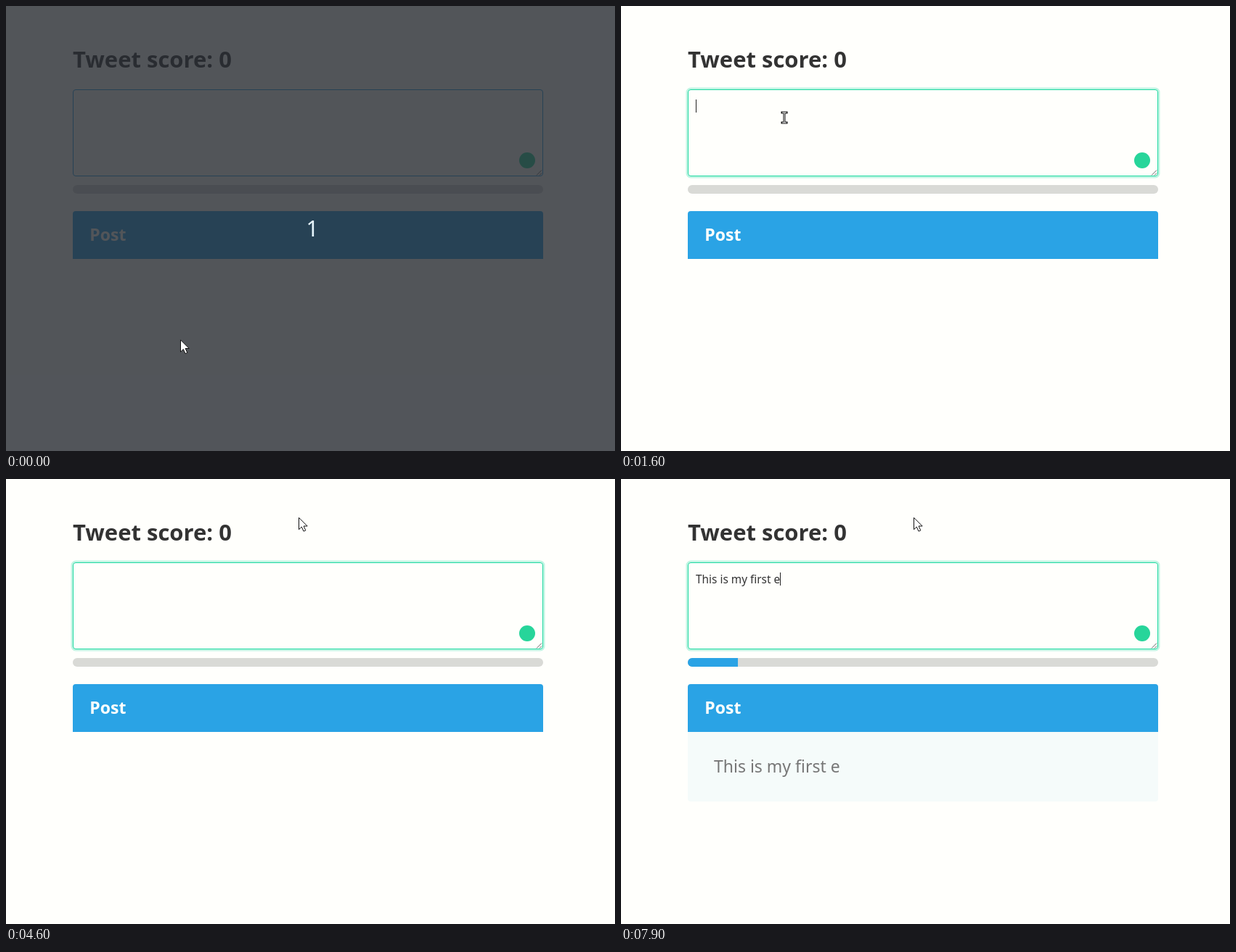
Write an HTML page that moves like this. It is 839 px wide and 614 px high and loops after 8000 ms.

```html
<!DOCTYPE html>
<html lang="en">
<head>
<meta charset="utf-8">
<title>Post score</title>
<style>
  html, body { margin: 0; width: 100%; height: 100%; overflow: hidden; background: #fffffc; }
  svg { display: block; width: 839px; height: 614px; }
  text { font-family: "Noto Sans", "Open Sans", sans-serif; white-space: pre; }
  .bold { font-weight: 700; }
</style>
</head>
<body>
<svg viewBox="0 0 839 614">
  <defs>
    <clipPath id="trackClip"><rect x="92" y="247" width="648" height="12" rx="6"/></clipPath>
  </defs>
  <rect width="839" height="614" fill="#fffffc"/>

  <text class="bold" x="92" y="85" font-size="31" fill="#333">Tweet score: 0</text>

  <g id="glow" fill="none" stroke="#1fd9a1">
    <rect x="91" y="114" width="650" height="122" rx="5" stroke-width="3" stroke-opacity=".28"/>
  </g>
  <rect id="field" x="92.5" y="115.5" width="647" height="119" rx="3.5" fill="#fffffc"/>
  <path d="M731 233.5L738 226.5M735 233.5L738 230.5" stroke="#666" fill="none"/>
  <circle cx="718" cy="213" r="11" fill="#27d59a"/>
  <text id="typed" x="103" y="144" font-size="15.4" fill="#333"></text>
  <rect id="caret" y="129" width="1" height="18" fill="#222"/>

  <g clip-path="url(#trackClip)">
    <rect x="92" y="247" width="648" height="12" fill="#d9dad6"/>
    <rect id="bar" x="92" y="247" height="12" fill="#2aa3e5"/>
  </g>

  <path d="M92 349V287Q92 283 96 283H736Q740 283 740 287V349Z" fill="#2aa3e5"/>
  <text class="bold" x="115.3" y="324" font-size="23" fill="#fffffc">Post</text>

  <g id="panel">
    <path d="M92 349H740V441Q740 445 736 445H96Q92 445 92 441Z" fill="#f5fbfa"/>
    <text id="preview" x="128" y="405" font-size="23" fill="#777"></text>
  </g>

  <g id="shade">
    <rect width="839" height="614" fill="rgb(39,43,49)" fill-opacity=".8"/>
    <text x="413.5" y="318" font-size="30" fill="#e9f7ff">1</text>
  </g>

  <path id="arrow" d="M.5 .8V17.2L4.3 13.6L7 19.6L9.8 18.4L7.1 12.5H12.2Z"
        fill="#fff" stroke="#111" stroke-linejoin="round"/>
  <g id="beam" fill="none">
    <path d="M-3-7H3M-3 7H3M0-7V7" stroke="#111" stroke-width="3" stroke-linecap="square"/>
    <path d="M-3-7H3M-3 7H3M0-7V7" stroke="#fff" stroke-width="1"/>
  </g>
</svg>
<script>
  const LOOP = 8000, FOCUS = 1600, BLINK = 600, CHAR_WIDTH = 3.835;
  const message = 'This is my first e';
  // Time at which each character of the message appears
  const keyTimes = [4670, 5100, 5200, 5300, 5500, 5700, 5830, 6000, 6200,
                    6330, 6500, 6700, 6800, 6930, 7100, 7270, 7330, 7900];
  // Pointer stops: time, x, y, shape
  const stops = [
    [0, 240, 460, 'arrow'], [100, 350, 460, 'arrow'], [300, 364, 461, 'arrow'],
    [770, 350, 418, 'arrow'], [870, 328, 365, 'arrow'], [1030, 305, 312, 'arrow'],
    [1070, 278, 252, 'arrow'], [1130, 252, 196, 'beam'], [1230, 238, 174, 'beam'],
    [1330, 228, 160, 'beam'], [1470, 226, 157, 'beam'], [1600, 225, 154, 'beam'],
    [3570, 262, 132, 'beam'], [3670, 322, 90, 'arrow'], [3770, 374, 66, 'arrow'],
    [3830, 388, 59, 'arrow'], [4000, 404, 52, 'arrow'], [4100, 403, 52.5, 'arrow']
  ];

  const part = {};
  document.querySelectorAll('svg [id]').forEach(node => part[node.id] = node);

  const show = (node, on) => node.setAttribute('visibility', on ? 'visible' : 'hidden');

  function drawPointer(t) {
    const [, x, y, shape] = stops.filter(stop => stop[0] <= t).pop();
    for (const name of ['arrow', 'beam']) show(part[name], name === shape);
    part[shape].setAttribute('transform', `translate(${x} ${y})`);
  }

  function drawText(t) {
    const count = keyTimes.filter(time => time <= t).length;
    const text = message.slice(0, count);
    if (part.typed.textContent !== text) {
      part.typed.textContent = text;
      part.preview.textContent = text;
    }
    part.bar.setAttribute('width', count * CHAR_WIDTH);
    show(part.panel, count > 0);

    const width = count ? part.typed.getComputedTextLength() : 0;
    part.caret.setAttribute('x', Math.round(103 + width));
    const lit = Math.floor((t - FOCUS + 30) / BLINK) % 2 === 0;
    show(part.caret, t >= FOCUS && (count > 0 || lit));
  }

  function draw(t) {
    const shaded = t < 70;
    show(part.shade, shaded);
    show(part.glow, t >= FOCUS);
    part.field.setAttribute('stroke', shaded ? '#2aa3e5' : '#1fd9a1');
    drawText(t);
    drawPointer(t);
  }

  const start = performance.now();
  function tick() {
    draw((performance.now() - start) % LOOP);
    requestAnimationFrame(tick);
  }
  tick();
</script>
</body>
</html>
```
